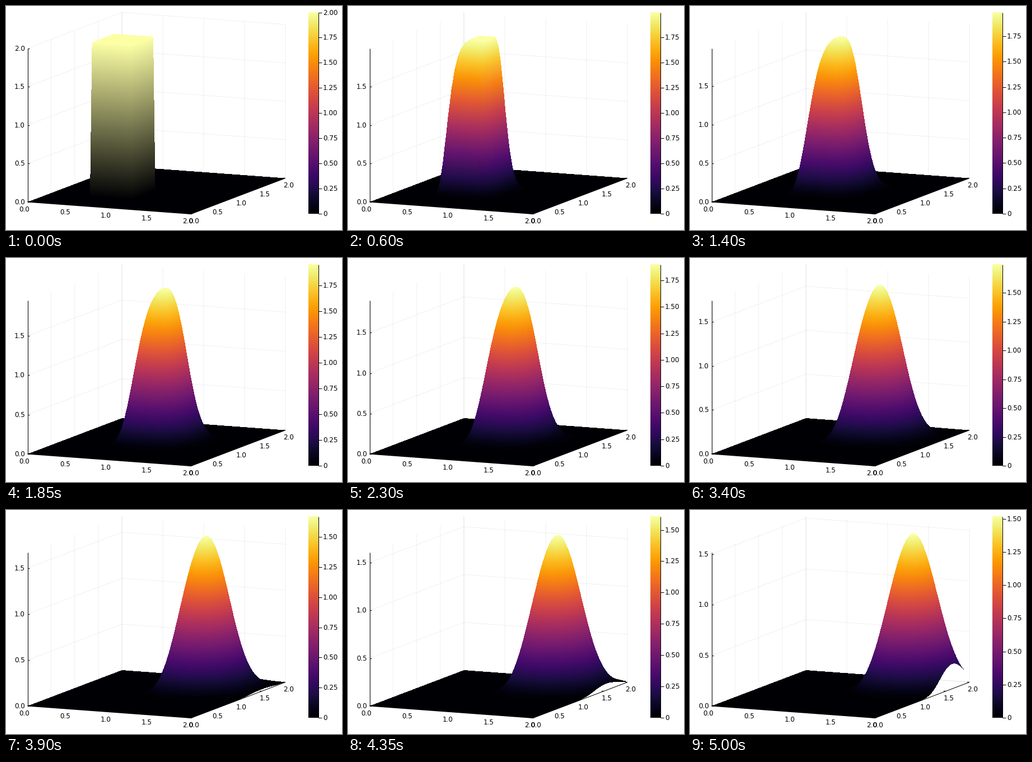
A matplotlib script that plays this animation: 600x400 px, repeating every 5.05 s.

```python
import numpy as np
import matplotlib.pyplot as plt
from matplotlib.animation import FuncAnimation
from matplotlib.collections import LineCollection

W, H, DPI = 600, 400, 100
FRAMES, INTERVAL = 101, 50
PX = 72 / DPI                       # one pixel in points

# 2D linear convection, upwind scheme updated in place
N, COURANT = 81, 0.2
DX = 2 / (N - 1)

# oblique projection: pixels per unit of x and y, full height of z
OX, OY = 38.5, 350.0
XX, XY = 146.0, 10.75
YX, YY = 84.25, -32.0
TALL = 274.5

# colour bar
BAR_L, BAR_R, BAR_T, BAR_B = 540, 558, 11.5, 371.0

inferno = plt.get_cmap("inferno")


def solve():
    u = np.zeros((N, N))
    u[20:40, 20:40] = 2
    sweep = np.linalg.inv(np.eye(N) - COURANT * np.eye(N, k=-1))
    states = [u.copy()]
    for _ in range(FRAMES - 1):
        for j in range(1, N):
            u[j] = sweep @ ((1 - 2 * COURANT) * u[j] + COURANT * u[j - 1])
        states.append(u.copy())
    return states


def project(x, y, h=0.0):
    return OX + XX * x + YX * y, OY + XY * x + YY * y - TALL * h


def locate(x, y):
    """Corner indices and weights in the triangulated mesh."""
    gx = np.clip(x / DX, 0, N - 1)
    gy = np.clip(y / DX, 0, N - 1)
    i = np.minimum(gx.astype(int), N - 2)
    j = np.minimum(gy.astype(int), N - 2)
    fx, fy = gx - i, gy - j
    low = np.maximum(1 - fx - fy, 0)
    high = np.maximum(fx + fy - 1, 0)
    k = j * N + i
    return (k, k + 1, k + N, k + N + 1), (low, fx - high, fy - high, high)


def sample(values, spot):
    idx, wts = spot
    return sum(values[k] * (w if values.ndim == 1 else w[..., None])
               for k, w in zip(idx, wts))


# floor line seen through each pixel column, front to back,
# cut wherever it crosses an edge of the mesh
LEFT, COLS, TOP, BOTTOM = 38, 460, 30, 376
span = np.arange(COLS) + 0.5 + LEFT - OX
col = span[:, None]
near = np.maximum(0, (col - 2 * XX) / YX)
far = np.minimum(2, col / YX)
knots = np.arange(N) * DX
sums = np.arange(2 * N - 1) * DX
cuts = np.hstack([np.tile(knots, (COLS, 1)),
                  (col - XX * knots) / YX,
                  (col - XX * sums) / (YX - XX)])
ys = np.sort(np.clip(cuts, near, far), axis=1)
xs = (col - YX * ys) / XX
floor_y = OY + XY * xs + YY * ys
mesh_spot = locate(xs, ys)
nudge = np.arange(ys.shape[1]) * 1e-6
rows = -(np.arange(TOP, BOTTOM) + 0.5)


def surface_image(u, top):
    height = sample(u.ravel() / top, mesh_spot)
    horizon = nudge - np.minimum.accumulate(floor_y - TALL * height, axis=1)
    hit = np.empty((len(rows), COLS))
    for c in range(COLS):
        hit[:, c] = np.interp(rows, horizon[c], ys[c], left=np.nan, right=np.nan)
    seen = ~np.isnan(hit)
    y = hit[seen]
    x = (np.broadcast_to(span, hit.shape)[seen] - YX * y) / XX
    rgb = inferno(u / top)[..., :3].reshape(-1, 3)
    img = np.zeros(hit.shape + (4,), np.uint8)
    img[seen, :3] = np.clip(sample(rgb, locate(x, y)) * 255 + 0.5, 0, 255)
    img[seen, 3] = 255
    return img


def ticks(step, top):
    return np.arange(int(top / step + 1e-12) + 1) * step


states = solve()

fig = plt.figure(figsize=(W / DPI, H / DPI), dpi=DPI, facecolor="white")
ax = fig.add_axes([0, 0, 1, 1])
ax.axis("off")


def label(x, y, s):
    """Text starting at x, vertically centred on y."""
    return ax.text(x, y + 4, s, fontsize=12 * PX, family="DejaVu Sans",
                   color="black", ha="left", va="baseline", zorder=5)


def lines(color, width, z):
    return ax.add_collection(
        LineCollection([], colors=[color], linewidths=width * PX, zorder=z))


surf = ax.imshow(np.zeros((len(rows), COLS, 4), np.uint8), zorder=2,
                 extent=(LEFT, LEFT + COLS, BOTTOM, TOP), interpolation="nearest")
ax.imshow(inferno(np.linspace(1, 0, 256))[:, None, :], zorder=2, aspect="auto",
          extent=(BAR_L, BAR_R, BAR_B, BAR_T), interpolation="nearest")
ax.set_xlim(0, W)
ax.set_ylim(H, 0)
ax.set_aspect("auto")

grid = lines((0, 0, 0, 0.06), 1, 1)
marks = lines("black", 1, 4)
frame_lines = lines("black", 1, 3)
frame_lines.set_segments([
    [project(0, 0, 1), project(0, 0)],
    [project(0, 0), project(2, 0), project(2, 2)],
    [(BAR_R - 0.5, BAR_T), (BAR_R - 0.5, BAR_B)],
])

floor_grid = []
floor_marks = []
for t in np.arange(5) * 0.5:
    floor_grid.append([project(t, 0), project(t, 2), project(t, 2, 1)])
    floor_grid.append([project(2, t), project(0, t), project(0, t, 1)])
    floor_marks.append([project(t, 0), project(t, 0.035)])
    floor_marks.append([project(2, t), project(1.973, t)])
    px, py = project(t, 0)
    label(px - 15.4, py + 12.9, f"{t:.1f}")
    px, py = project(2, t)
    label(px - 4.1, py + 12.6, f"{t:.1f}")

moving = []


def draw(n):
    while moving:
        moving.pop().remove()
    u = states[n]
    top = u.max()
    surf.set_data(surface_image(u, top))

    walls, dashes = [], []
    for t in ticks(0.5, top):
        h = t / top
        walls.append([project(0, 0, h), project(0, 2, h), project(2, 2, h)])
        px, py = project(0, 0, h)
        dashes.append([(px, py), (px + 3, py)])
        moving.append(label(14.9, py, f"{t:.1f}"))
    for t in ticks(0.25, top):
        y = BAR_B - (BAR_B - BAR_T) * t / top
        dashes.append([(BAR_R, y), (BAR_R + 6, y)])
        moving.append(label(566, y, f"{t:.2f}" if t else "0"))
    grid.set_segments(floor_grid + walls)
    marks.set_segments(floor_marks + dashes)
    return [surf, grid, marks] + moving


anim = FuncAnimation(fig, draw, frames=FRAMES, interval=INTERVAL,
                     repeat=True, repeat_delay=0, blit=False)
plt.show()
```
